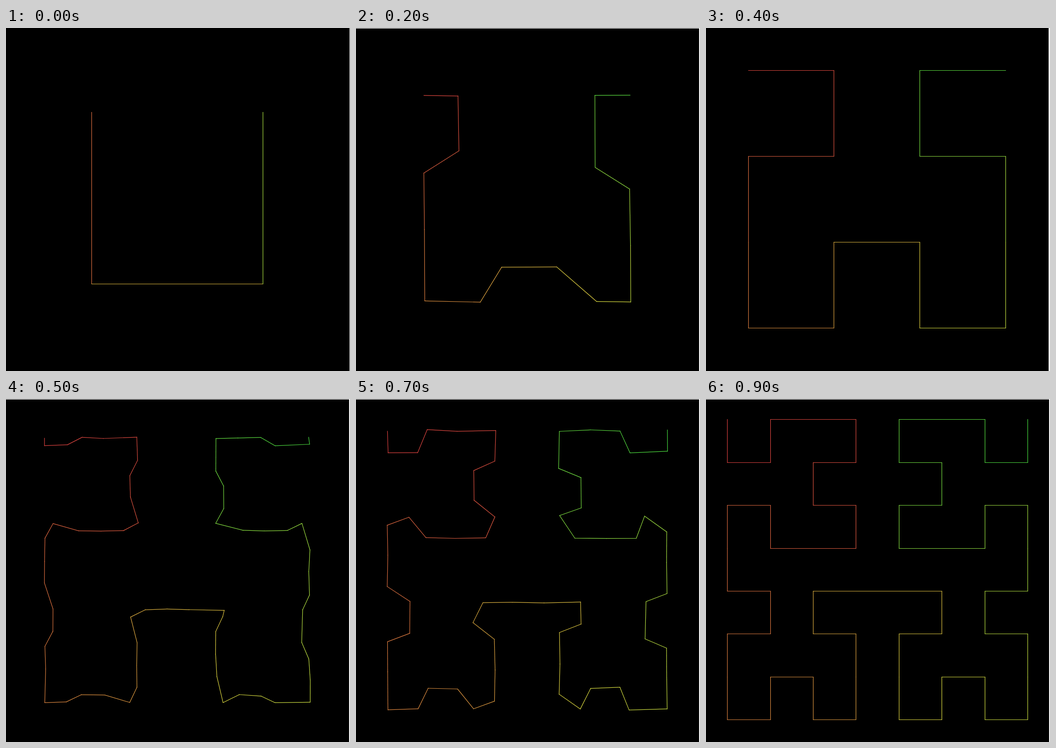
These frames come from a looping animation (749x747 px, 1000 ms). An HTML page:

```html
<!DOCTYPE html>
<html>
<head>
<meta charset="utf-8">
<style>
  html, body { margin: 0; width: 100%; height: 100%; overflow: hidden; background: #fff; }
  svg { display: block; width: 749px; height: 747px; }
  line { stroke-width: 1.2; stroke-linecap: square; }
</style>
</head>
<body>
<svg viewBox="0 0 749 747"><rect id="board"/><g id="curve"></g></svg>
<script>
const LOOP = 1000, STEP = 100, SIZE = 747.5;
const ORIGIN = { 1: [186, 183.5], 2: [92, 92.4], 3: [46.6, 44.7] };
const WOBBLE = 2;

const mix = (a, b, e) => a + (b - a) * e;
const mixPoint = (p, q, e) => [mix(p[0], q[0], e), mix(p[1], q[1], e)];

// cells of a U-shaped Hilbert curve, from top left to top right
function cells(order) {
  if (!order) return [[0, 0]];
  const h = 2 ** (order - 1), m = h - 1, sub = cells(order - 1);
  return [
    ...sub.map(([x, y]) => [y, x]),
    ...sub.map(([x, y]) => [x, y + h]),
    ...sub.map(([x, y]) => [x + h, y + h]),
    ...sub.map(([x, y]) => [h + m - y, m - x])
  ];
}

function hilbert(order) {
  const gap = SIZE / 2 ** order, [ox, oy] = ORIGIN[order];
  return cells(order).map(([x, y]) => [Math.floor(ox + x * gap) + .5, Math.floor(oy + y * gap) + .5]);
}

// spread n points over a coarser curve; the ends and the middle corner count twice
function spread(path, n) {
  const last = path.length - 1;
  return Array.from({ length: n }, (_, i) => {
    const j = Math.min(4 * last, Math.max(0, i - (i > n / 2 + 1 ? 2 : 1)));
    const k = Math.floor(j / 4);
    return mixPoint(path[k], path[Math.min(k + 1, last)], (j % 4) * .21);
  });
}

const curves = { 1: hilbert(1), 2: hilbert(2), 3: hilbert(3) };
const starts = { 2: spread(curves[1], 16), 3: spread(curves[2], 64) };

function random(seed) {
  return () => {
    seed = (seed * 1664525 + 1013904223) % 4294967296;
    return seed / 4294967296;
  };
}

// even progress towards the next curve, then a snap onto it
const morph = (order, k, count) => ({ order, e: k < count ? k / (count + 1) : 1 });

function stage(step) {
  if (step === 0) return { order: 1, e: 1 };
  return step <= 4 ? morph(2, step, 4) : morph(3, step - 4, 5);
}

function pose({ order, e }, step) {
  if (e === 1) return curves[order];
  const rand = random(step);
  const wobble = v => v + (rand() * 2 - 1) * WOBBLE;
  return curves[order].map((p, i) => mixPoint(starts[order][i], p, e).map(wobble));
}

const board = document.getElementById("board");
const group = document.getElementById("curve");
const lines = Array.from({ length: 63 }, () =>
  group.appendChild(document.createElementNS("http://www.w3.org/2000/svg", "line")));

function set(el, attrs) {
  for (const key in attrs) el.setAttribute(key, attrs[key]);
}

function draw(step) {
  const now = stage(step), pts = pose(now, step);
  const flush = now.e === 1 && now.order < 3;
  const top = flush ? 0 : 1, right = flush ? 750 - 2 * now.order : 747;
  set(board, { x: 0, y: top, width: right, height: 747 - top });
  lines.forEach((line, i) => {
    const a = pts[i], b = pts[i + 1];
    line.style.display = b ? "" : "none";
    if (!b) return;
    const hue = 120 * ((i + 1) / pts.length) ** 1.4;
    set(line, { x1: a[0], y1: a[1], x2: b[0], y2: b[1], stroke: `hsl(${hue.toFixed(1)} 70% 56%)` });
  });
}

let begin = null, shown = -1;
function tick(now) {
  if (begin === null) begin = now;
  const step = Math.floor(((now - begin) % LOOP) / STEP);
  if (step !== shown) draw(shown = step);
  requestAnimationFrame(tick);
}
draw(0);
requestAnimationFrame(tick);
</script>
</body>
</html>
```
